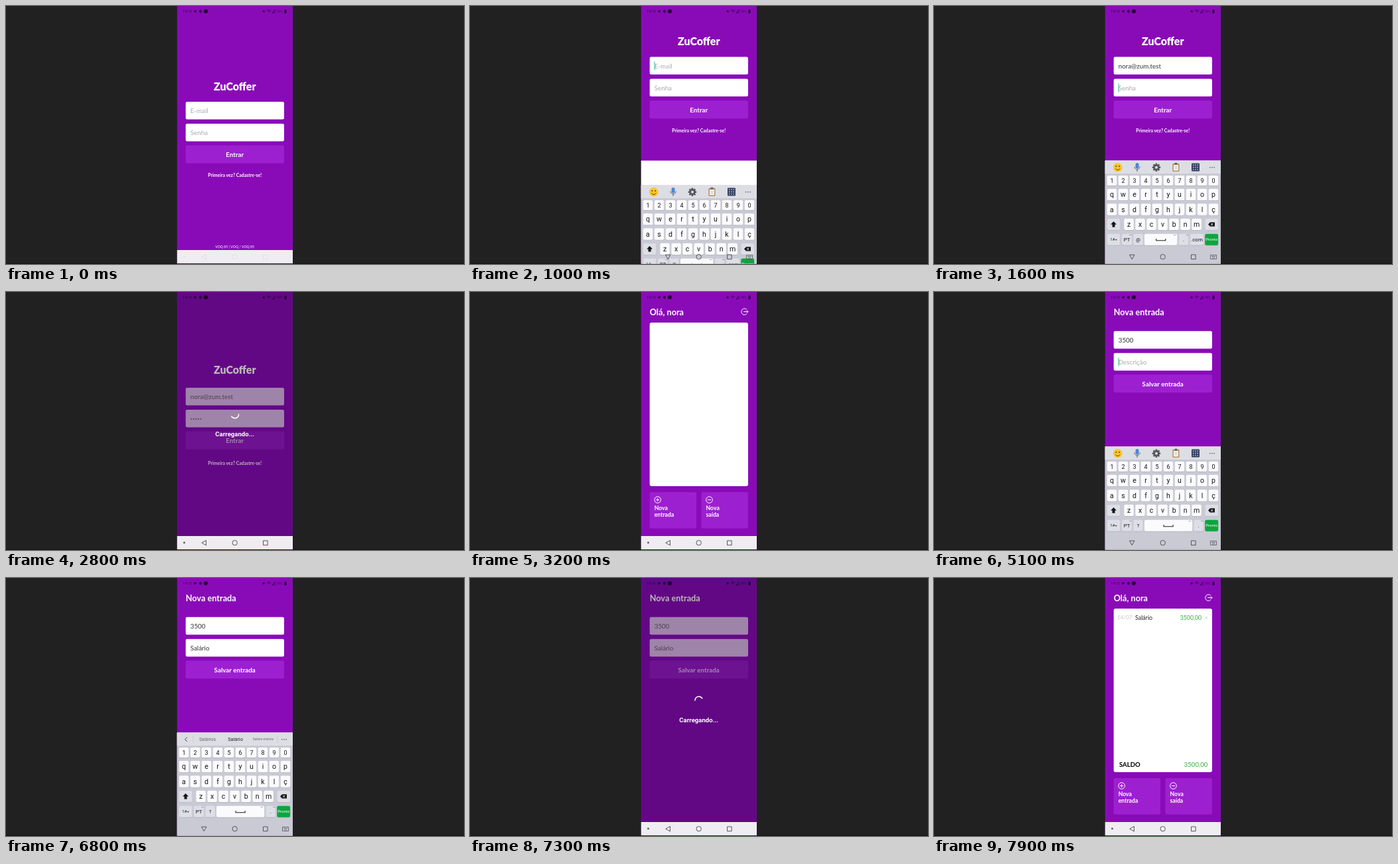
An HTML page with a canvas that plays this animation: 690 px wide and 388 px high, repeating every 8000 ms.

```html
<!DOCTYPE html>
<html lang="pt">
<head>
<meta charset="utf-8">
<style>
html, body { margin: 0; height: 100%; overflow: hidden; background: #212122; }
canvas { display: block; }
</style>
</head>
<body>
<canvas id="stage" width="690" height="388"></canvas>
<script>
const c = document.getElementById('stage').getContext('2d');
const LOOP = 8000, LEFT = 257.5, WIDTH = 174.5, MID = 344.7;
const PURPLE = '#890bb8', BUTTON = '#9d20d0', INK = '#333', HINT = '#aaa', GREEN = '#35ab3b', CARET = '#26b8a8';
const EMAIL = 'nora@zum.test', WORD = 'Salário', SECRET = 'senha';
const WORD_TIMES = [5400, 5600, 5800, 6000, 6300, 6500, 6700];
const LATO = 'Lato, sans-serif', ROBOTO = 'Roboto, sans-serif';

const clamp = (v, lo, hi) => Math.min(hi, Math.max(lo, v));
const typed = (t, start, per, n) => clamp(Math.floor((t - start) / per) + 1, 0, n);

function rect(x, y, w, h, fill, r = 0) {
  c.fillStyle = fill;
  c.beginPath();
  c.roundRect(x, y, w, h, r);
  c.fill();
}
function text(s, x, y, size, fill, { align = 'left', weight = 400, font = LATO } = {}) {
  c.font = `${weight} ${size}px ${font}`;
  c.textAlign = align;
  c.fillStyle = fill;
  c.fillText(s, x, y + size * .34);
  return c.measureText(s).width;
}
function line(points, stroke, width = 1, close = false) {
  c.strokeStyle = stroke;
  c.lineWidth = width;
  c.beginPath();
  points.forEach(p => c.lineTo(...p));
  if (close) c.closePath();
  c.stroke();
}
function arc(x, y, r, color, { from = 0, to = 2 * Math.PI, width = 0 } = {}) {
  c.beginPath();
  c.arc(x, y, r, from, to);
  if (width) {
    c.strokeStyle = color;
    c.lineWidth = width;
    c.stroke();
  } else {
    c.fillStyle = color;
    c.fill();
  }
}
function alpha(a, draw) {
  c.save();
  c.globalAlpha *= a;
  draw();
  c.restore();
}

function statusBar() {
  const dark = '#35074c';
  text('14:15', 266, 8, 5.6, dark, { font: ROBOTO });
  rect(283, 6.5, 4, 3, dark, 1);
  arc(293, 8, 2.2, dark);
  arc(301, 8, 3, '#22052f');
  arc(388, 8, 1.8, dark);
  const wifi = { from: -2.4, to: -.75, width: 1 };
  arc(396, 10, 4, dark, wifi);
  arc(396, 10, 2, dark, wifi);
  line([[401, 10.5], [405, 10.5], [405, 5.5]], dark, .8, true);
  text('76%', 407.5, 8, 5, dark, { font: ROBOTO });
  rect(419.5, 5.5, 3, 5.5, '#22052f', .6);
}

function navBar(visible, down) {
  if (!down) rect(LEFT, 367, WIDTH, 20, '#efedf1');
  const ink = '#55555a';
  alpha(visible, () => {
    if (!down) arc(268.5, 377, 1.4, ink);
    line(down ? [[294.5, 374.2], [302, 374.2], [298.2, 380.8]]
              : [[301.5, 373.5], [301.5, 381], [294.8, 377.2]], ink, 1, true);
    arc(MID, 377.2, 3.7, ink, { width: 1 });
    line([[387.5, 374], [394.2, 374], [394.2, 380.7], [387.5, 380.7]], ink, 1, true);
    if (down) {
      line([[416.5, 374.5], [425.5, 374.5], [425.5, 380.5], [416.5, 380.5]], ink, .8, true);
      line([[418, 376.5], [424, 376.5]], ink, .8);
      line([[419, 378.7], [423, 378.7]], ink, .8);
    }
  });
}

function field(y, hint, value, caretOn, faded, secret) {
  alpha(faded ? .7 : 1, () => {
    rect(270.7, y, 148.3, 26.5, '#fff', 2.3);
    const mid = y + 14;
    let w = 0;
    if (secret && value) {
      w = value.length * 3.5;
      [...value].forEach((_, i) => arc(279.3 + i * 3.5, mid, 1, INK));
    } else {
      w = text(value || hint, 277.7, mid, 9.8, value ? INK : HINT);
    }
    if (caretOn) rect(277.6 + (value ? w + .5 : 0), mid - 7, 1, 13, CARET);
  });
}
function button(y, label, faded) {
  alpha(faded ? .7 : 1, () => {
    rect(270.7, y, 148.3, 27, BUTTON, 2.3);
    text(label, MID, y + 14.3, 9.8, '#fff', { align: 'center', weight: 700 });
  });
}

function loginScreen(t) {
  const busy = t >= 2600, raised = t >= 1000 && t < 2700;
  const dy = raised ? -67.4 : 0, spread = t >= 2700 ? 3.5 : 0;
  const email = EMAIL.slice(0, clamp((t - 1100) / 25, 0, EMAIL.length));
  const secret = SECRET.slice(0, typed(t, 1900, 100, 5));
  const on = start => Math.floor((t - start) / 500) % 2 === 0;
  text('ZuCoffer', MID, 121.2 + dy - spread, 16, '#fff', { align: 'center', weight: 900 });
  field(144 + dy, 'E-mail', email, t >= 1000 && t < 1600 && on(1000), busy);
  field(177 + dy, 'Senha', secret, t >= 1600 && !busy && on(1600), busy, true);
  button(209.6 + dy, 'Entrar', busy);
  text('Primeira vez? Cadastre-se!', MID, 254.6 + dy + spread, 6.9, '#fff', { align: 'center', weight: 700 });
}

function entryScreen(t) {
  const busy = t >= 7000;
  const on = start => Math.floor((t - start) / 500) % 2 === 0;
  const word = WORD.slice(0, WORD_TIMES.filter(w => w <= t).length);
  text('Nova entrada', 270.7, 31, 12.7, '#fff', { weight: 700 });
  field(58.7, 'Valor', '3500'.slice(0, typed(t, 4500, 100, 4)), t >= 4000 && t < 5000 && on(4000), busy);
  field(91.7, 'Descrição', word, t >= 5000 && !busy && on(5000), busy);
  button(124.3, 'Salvar entrada', busy);
}

function homeScreen(filled) {
  text('Olá, nora', 270.7, 31, 12.7, '#fff', { weight: 700 });
  arc(413.5, 29.6, 4.7, '#fff', { from: .75, to: 5.5, width: 1 });
  line([[412, 29.6], [419, 29.6]], '#fff');
  line([[417, 27.5], [419, 29.6], [417, 31.7]], '#fff');
  rect(270.7, 46, 148.3, 246, '#fff', 3);
  if (filled) {
    text('14/07', 276, 59.7, 8.2, '#c6c6c6');
    text(WORD, 303, 59.7, 8.9, '#222');
    text('3500,00', 403, 59.7, 8.7, GREEN, { align: 'right' });
    line([[408.2, 57.8], [412.2, 61.8]], '#c6c6c6', .8);
    line([[412.2, 57.8], [408.2, 61.8]], '#c6c6c6', .8);
    text('SALDO', 279, 280.5, 9.6, '#000', { weight: 700 });
    text('3500,00', 412.3, 280.5, 9.6, GREEN, { align: 'right' });
  }
  [[270.7, 'entrada'], [348.5, 'saída']].forEach(([x, label], i) => {
    rect(x, 301, 70.3, 54.5, BUTTON, 2.3);
    arc(x + 12, 312.5, 4.8, '#fff', { width: 1 });
    line([[x + 9.5, 312.5], [x + 14.5, 312.5]], '#fff');
    if (!i) line([[x + 12, 310], [x + 12, 315]], '#fff');
    text('Nova', x + 7, 325, 8.7, '#fff', { weight: 700 });
    text(label, x + 7, 335, 8.7, '#fff', { weight: 700 });
  });
}

function key(x, y, w, label, { h = 17, fill = '#fbfbfd', size = 10.5, ink = '#151517' } = {}) {
  rect(x - w / 2, y - h / 2 + .7, w, h, '#aeb0ba', 2.2);
  rect(x - w / 2, y - h / 2, w, h, fill, 2.2);
  text(label, x, y, size, ink, { align: 'center', font: ROBOTO });
}

function toolIcons() {
  arc(276.8, 242.7, 6.8, '#fbc52d');
  arc(274.4, 241, 1, '#63401a');
  arc(279.2, 241, 1, '#63401a');
  arc(276.8, 243, 3.6, '#63401a', { from: .4, to: 2.74, width: 1 });
  rect(303.6, 236, 5, 8.5, '#4b86d8', 2.5);
  arc(306.1, 241.5, 4.2, '#667', { from: 0, to: Math.PI, width: 1 });
  line([[306.1, 245.5], [306.1, 249]], '#667', 1.2);
  for (let i = 0; i < 8; i++) {
    const a = i * Math.PI / 4;
    line([[335, 242.7], [335 + 6.2 * Math.cos(a), 242.7 + 6.2 * Math.sin(a)]], '#55575d', 2.6);
  }
  arc(335, 242.7, 4.8, '#55575d');
  arc(335, 242.7, 2, '#dddee4');
  rect(359.5, 237, 10, 12, '#b98a55', 1.3);
  rect(361, 239, 7, 8.5, '#fff');
  rect(362.3, 235.8, 4.4, 2.8, '#666', 1);
  [241, 243, 245].forEach(y => line([[362, y], [367, y]], '#9ab', .7));
  rect(388, 236.5, 12, 12, '#34415f', 1.3);
  for (let i = 0; i < 9; i++) arc(390.7 + i % 3 * 3.3, 239.2 + Math.floor(i / 3) * 3.3, .9, '#a9c0ea');
}

function suggestions(word) {
  line([[273, 239.5], [269.5, 242.7], [273, 246]], '#444');
  [282, 409].forEach(x => line([[x, 237], [x, 248]], '#c4c5cd', .7));
  const done = word === WORD, mid = { align: 'center', font: ROBOTO };
  text(done ? 'Salários' : word, 303.5, 242.8, 7, '#66676e', mid);
  text(WORD, 345.5, 242.8, 7.4, '#222', mid);
  if (done) text('Salário-mínimo', 387.5, 242.8, 4.7, '#66676e', mid);
}

function keyboard(t, drop) {
  const login = t < 4000;
  const caps = !login && (t < 4500 || (t >= 5200 && t < 5400));
  const word = login ? '' : WORD.slice(0, WORD_TIMES.filter(w => w <= t).length);
  let pressed = '';
  if (t >= 1900 && t < 2400) pressed = SECRET[(t - 1900) / 100];
  if (t >= 4500 && t < 4900) pressed = '3500'[(t - 4500) / 100];
  if (WORD_TIMES.includes(t)) pressed = WORD[WORD_TIMES.indexOf(t)].toLowerCase().replace('á', 'a');

  c.save();
  c.translate(0, drop);
  rect(LEFT, 232.5, WIDTH, 156, '#c9cad4');
  rect(LEFT, 232.5, WIDTH, 19.5, '#dddee4');
  if (word) suggestions(word); else toolIcons();
  [415.8, 419, 422.2].forEach(x => arc(x, 242.8, .8, '#444'));

  const rows = [['1234567890', 268, 262.5], ['qwertyuiop', 268, 283.7], ['asdfghjklç', 268, 306], ['zxcvbnm', 293.6, 328.4]];
  rows.forEach(([chars, x, y], r) => [...chars].forEach((ch, i) => key(x + i * 17, y, 14.6, caps ? ch.toUpperCase() : ch, {
    h: r ? 17.3 : 15, size: r ? 10.6 : 9, fill: ch === pressed ? '#d5d6de' : '#fbfbfd'
  })));

  const side = { fill: '#dddee6', size: 6 };
  key(270.6, 328.4, 19.6, '', side);
  c.fillStyle = caps ? '#12a541' : '#111';
  c.beginPath();
  [[270.6, 324], [275, 328.6], [272.6, 328.6], [272.6, 332.4], [268.6, 332.4], [268.6, 328.6], [266.2, 328.6]].forEach(p => c.lineTo(...p));
  c.fill();
  key(418.2, 328.4, 19.6, '', side);
  c.fillStyle = '#111';
  c.beginPath();
  [[413, 328.4], [416, 325.2], [423, 325.2], [423, 331.6], [416, 331.6]].forEach(p => c.lineTo(...p));
  c.fill();
  line([[417, 326.8], [420.4, 330]], '#fff', .9);
  line([[420.4, 326.8], [417, 330]], '#fff', .9);

  key(270.6, 351.3, 19.6, '1#+', side);
  key(290.6, 351.3, 15, 'PT', { ...side, size: 8 });
  key(307.6, 351.3, 14.6, login ? '@' : '?', { ...side, size: 7.5 });
  const spaceEnd = login ? 366.5 : 389.3, spaceMid = (317 + spaceEnd) / 2;
  key(spaceMid, 351.3, spaceEnd - 317, '');
  line([[spaceMid - 7, 350], [spaceMid - 7, 352.7], [spaceMid + 7, 352.7], [spaceMid + 7, 350]], '#222', 1.1);
  key(login ? 376 : 398.6, 351.3, 14.6, '.', { ...side, size: 8 });
  if (login) key(396, 351.3, 20, '.com', { ...side, size: 8 });
  [296, spaceEnd - 4, login ? 381.5 : 404].forEach(x => line([[x - 1.8, 344.5], [x + 1.8, 344.5]], '#888', .7));
  key(418.2, 351.3, 19.8, 'Pronto', { fill: '#0ba63c', size: 6, ink: '#fff' });
  c.restore();
}

function loader(t) {
  rect(LEFT, 0, WIDTH, 388, 'rgba(0,0,0,.28)');
  const a = (t - 2800) / 1000 * 2 * Math.PI;
  arc(344.8, 184, 5.8, '#fff', { from: a - .1, to: a + 2.7, width: 1.5 });
  text('Carregando...', MID, 213.7, 9.6, '#fff', { align: 'center', weight: 700, font: ROBOTO });
}

function draw(t) {
  rect(0, 0, 690, 388, '#212122');
  rect(0, 387, 690, 1, '#121212');
  c.save();
  c.beginPath();
  c.rect(LEFT, 0, WIDTH, 387.4);
  c.clip();
  rect(LEFT, 0, WIDTH, 388, PURPLE);
  statusBar();

  if (t < 3200) loginScreen(t);
  else if (t < 3700 || t >= 7900) homeScreen(t >= 7900);
  else entryScreen(t);

  const carrier = clamp(1 - t / 200, 0, 1);
  alpha(carrier, () => text('VOQ 85 | VOQ / VOQ 85', MID, 362.5, 5.2, '#fff', { align: 'center' }));

  const opened = t < 2700 ? 1000 : 4200;
  const typing = (t >= 1000 && t < 2700) || (t >= 4200 && t < 7100);
  const busy = (t >= 2600 && t < 3200) || (t >= 7000 && t < 7900);
  if (busy) loader(t);
  if (typing) {
    const drop = [37, 8][(t - opened) / 100] || 0;
    rect(LEFT, 232.5, WIDTH, 156, '#fff');
    keyboard(t, drop);
  }
  navBar(clamp(.08 + t / 200, 0, 1), typing);
  c.restore();
}

function frame(now) {
  draw(Math.floor(now % LOOP / 100) * 100);
  requestAnimationFrame(frame);
}
requestAnimationFrame(frame);
</script>
</body>
</html>
```
